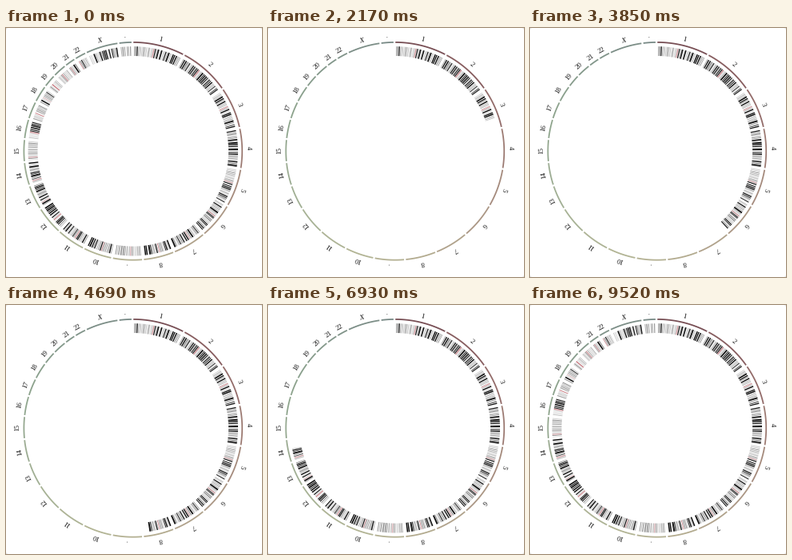
Recreate the animation shown at these times as a matplotlib script. Size 320 px wide and 312 px high, loop 9.87 s.

```python
import colorsys
import numpy as np
import matplotlib.pyplot as plt
from matplotlib.animation import FuncAnimation
from matplotlib.collections import PolyCollection
from matplotlib.patches import Circle, FancyBboxPatch

W, H, DPI = 320, 312, 100
PX = 72 / DPI
FRAMES, STEP = 141, 70
HOLD, SWEEP = 5, 131          # frames of the full circle, frames of the redraw
CX, CY = 158.8, 154.3
R_RING, R_LABEL, R_IN, R_OUT = 136.4, 144.3, 119.3, 131.2
GAP, START = 1.0, 0.2         # degrees

NAMES = [str(n) for n in range(1, 23)] + ["X", "Y"]
SIZES = [249, 243, 198, 191, 181, 171, 159, 146, 141, 136, 135, 134,
         115, 107, 103, 90, 81, 78, 59, 63, 48, 51, 155, 59]   # Mb
SCALE = (360 - GAP * len(SIZES)) / sum(SIZES)
ACROCENTRIC = {"13", "14", "15", "21", "22"}
PALE = {"9", "15", "17", "19", "20", "Y"}
UNNAMED = {"9", "Y"}


def polar(deg, r):
    a = np.radians(deg)
    return CX + r * np.sin(a), CY - r * np.cos(a)


def ring_color(u):
    """Mauve through olive to teal, lightest near the bottom left."""
    hue = (-10 + 180 * u ** 1.5) / 360 % 1
    sat = .13 + .23 * (1 - u) ** 2
    return colorsys.hsv_to_rgb(hue, sat, .44 + .22 * np.sin(np.pi * u) + .09 * u)


def make_bands(name, size, rng):
    """Yield (start, end, colour) in Mb for one chromosome."""
    center = size * (.16 if name in ACROCENTRIC else .42)
    black = 0 if name in PALE else .4
    pos = rng.uniform(2, 4)
    while pos < size - 5:
        width, gap = rng.uniform(2.5, 5), rng.uniform(2, 4.5)
        if pos <= center < pos + width + gap and name != "Y":
            color = colorsys.hsv_to_rgb(.985, rng.uniform(.25, .55), .75)
        elif rng.random() < black:
            width += rng.uniform(0, 3)
            color = (.04,) * 3
        else:
            color = (rng.uniform(.5, .88),) * 3
        yield pos, pos + width, color
        pos += width + gap


fig = plt.figure(figsize=(W / DPI, H / DPI), dpi=DPI, facecolor="#e4e4e4")
ax = fig.add_axes([0, 0, 1, 1])
ax.set(xlim=(0, W), ylim=(H, 0))
ax.axis("off")
ax.add_patch(FancyBboxPatch((0, 0), W, H, fc="white", ec="none",
                            boxstyle="round,pad=0,rounding_size=3"))

rng = np.random.default_rng(22)
quads, colors, starts = [], [], []
deg = START
for name, size in zip(NAMES, SIZES):
    stop = deg + size * SCALE
    mid = (deg + stop) / 2
    ax.plot(*polar(np.linspace(deg, stop, 60), R_RING), lw=1.8 * PX,
            color=ring_color(mid / 360), solid_capstyle="butt")
    if name in UNNAMED:
        ax.add_patch(Circle(polar(mid, 143), .6, fc="#777777", ec="none"))
    else:
        ax.text(*polar(mid, R_LABEL), name, rotation=-mid,
                ha="center", va="center", family="Liberation Serif",
                size=8.8 * PX, color="#101010",
                style="italic" if name == "X" else "normal")
    for a, b, color in make_bands(name, size, rng):
        a, b = deg + a * SCALE, deg + b * SCALE
        quads.append([polar(a, R_IN), polar(a, R_OUT),
                      polar(b, R_OUT), polar(b, R_IN)])
        colors.append(color)
        starts.append(a)
    deg = stop + GAP

bands = PolyCollection(quads, facecolors=colors, edgecolors="none")
ax.add_collection(bands, autolim=False)


def draw(i):
    turn = 360 * (i - HOLD) / SWEEP if i > HOLD else 360
    n = np.searchsorted(starts, turn)
    bands.set_verts(quads[:n])
    bands.set_facecolor(colors[:n])
    return bands,


anim = FuncAnimation(fig, draw, frames=FRAMES, interval=STEP,
                     repeat=True, repeat_delay=0)
plt.show()
```
